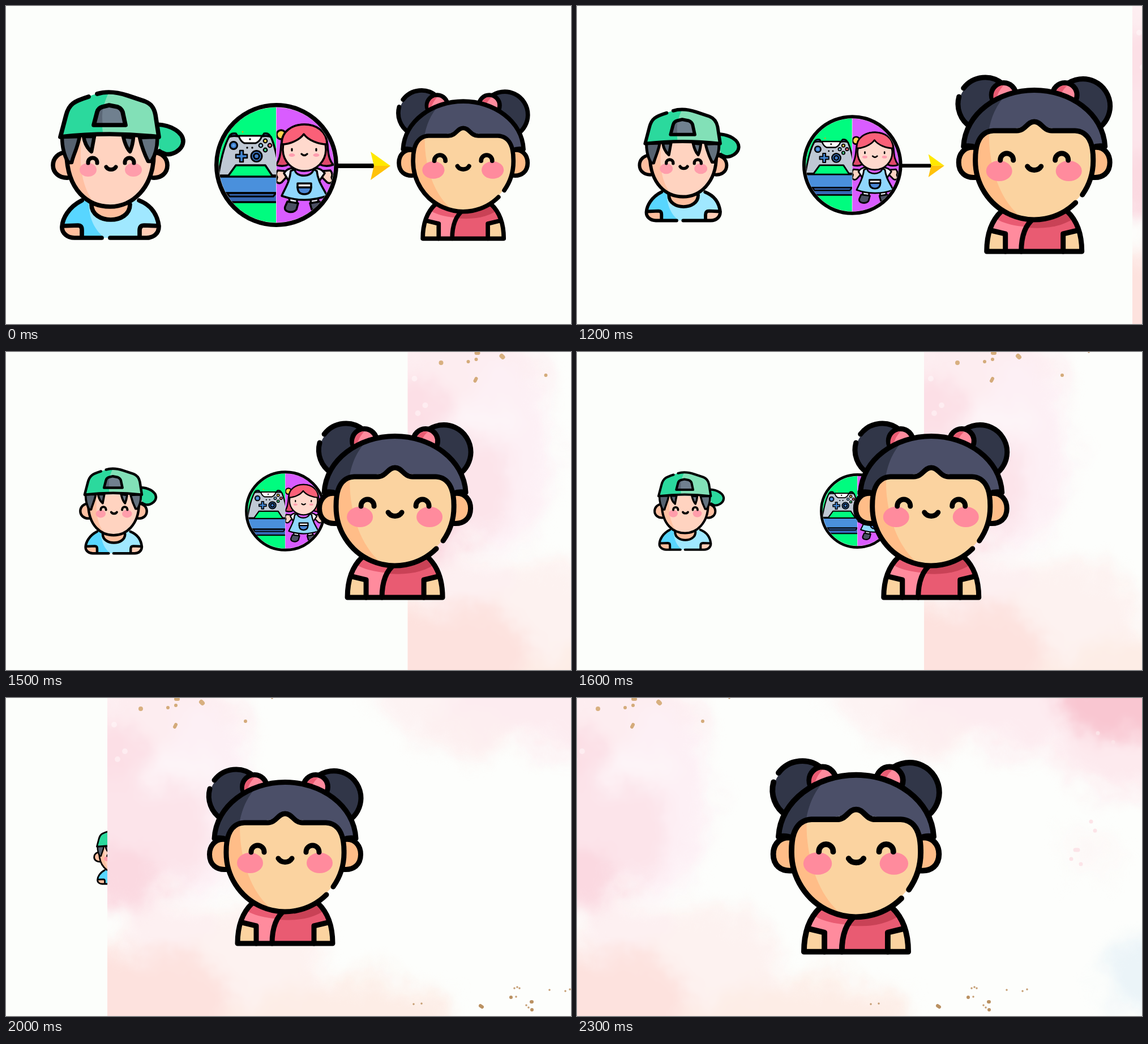
Animation of 998x561 px, one loop 2700 ms. Source, as an HTML page:

```html
<!DOCTYPE html>
<html lang="en">
<head>
<meta charset="utf-8">
<title>Boy, toys and girl</title>
<style>
  html, body { margin: 0; width: 100%; height: 100%; overflow: hidden; background: #fcfefb; }
  svg { display: block; width: 100%; height: 100%; }
  .ink { fill: none; stroke: #000; stroke-linecap: round; stroke-linejoin: round; }
  .line { stroke: #000; stroke-linecap: round; stroke-linejoin: round; }
  .dots { fill: none; stroke-linecap: round; }
</style>
</head>
<body>
<svg viewBox="0 0 998 561">
  <defs>
    <clipPath id="capClip"><path d="M96 231L106 193C111 173 120 168 148 159C175 149 194 151 215 158L245 168C258 173 262 182 264 192L270 231Q183 221 96 231Z"/></clipPath>
    <clipPath id="faceClip"><path d="M107 230V268C110 325 145 354 184 354C222 354 260 322 261 268V230Z"/></clipPath>
    <clipPath id="shirtClip"><path d="M134 343C110 355 100 375 99 389C98 401 109 409 121 409H248C261 409 270 401 270 389C268 370 258 352 235 343Z"/></clipPath>
    <clipPath id="holeClip"><path d="M155 210L161 187Q163 180 170 178L182 175L197 178Q204 181 206 187L211 210Z"/></clipPath>
    <clipPath id="discClip"><circle cx="477.5" cy="280.5" r="103"/></clipPath>
    <clipPath id="leftHalf"><path d="M368 170H477V391H368Z"/></clipPath>
    <clipPath id="rightHalf"><path d="M477 170H588V391H477Z"/></clipPath>
    <clipPath id="domeClip"><path d="M368 248C371 189 430 148.500 493 148.500S615 189 618 248L590 290H396Z"/></clipPath>
    <clipPath id="girlFace"><path id="oval" d="M597 270C597 240 587 221 565 220H524C508 220 506 204 493 204S478 220 462 220H421C399 221 389 240 389 270A104 104 0 0 0 597 270Z"/></clipPath>
    <clipPath id="dressClip"><path id="torso" d="M435 362C418 378 409 400 409 433H577C577 400 568 378 551 362Z"/></clipPath>
    <clipPath id="paneClip"><path d="M-22 0H1024V561H-22Z"/></clipPath>
    <filter id="wash" filterUnits="userSpaceOnUse" x="-140" y="-90" width="1280" height="740" color-interpolation-filters="sRGB">
      <feGaussianBlur stdDeviation="17" result="soft"/>
      <feTurbulence type="fractalNoise" baseFrequency=".012" numOctaves="4" seed="7" result="grain"/>
      <feDisplacementMap in="soft" in2="grain" scale="75" xChannelSelector="R" yChannelSelector="G"/>
    </filter>
  </defs>

  <g id="boy">
    <path class="line" stroke-width="7.700" fill="#2bd99d" d="M267 209C292 210 313 223 313 239C312 254 294 264 281 261Q275 259 271 256"/>
    <g clip-path="url(#shirtClip)">
      <path fill="#a0e8ff" d="M95 340H275V412H95Z"/>
      <path fill="#58d6ff" d="M95 340H146C145 376 158 398 178 412H95Z"/>
      <path fill="#ffbe9d" d="M95 388L127 387Q134 387 134 395V412H95Z"/>
      <path fill="#ffcdb6" d="M275 388L244 387Q236 387 236 396V412H275Z"/>
    </g>
    <path class="line" stroke-width="7.700" fill="#ffbe9d" d="M151 350C151 386 219 386 219 350"/>
    <path class="ink" stroke-width="7.700" d="M134 343C110 355 100 375 99 389C98 401 109 409 121 409H169M184 409H248C261 409 270 401 270 389C268 370 258 352 235 343M100 388L127 387Q134 387 134 395V409M270 388L244 387Q236 387 236 396V409"/>
    <path class="line" stroke-width="7.700" fill="#ffc0a2" d="M108 258C92 258 83 269 83 281C83 294 94 304 110 303M261 258C276 259 285 269 285 281C285 294 275 304 259 303"/>
    <g clip-path="url(#faceClip)">
      <path fill="#ffd3c0" d="M100 225H270V360H100Z"/>
      <path fill="#ffc0a2" d="M100 225H134C128 285 133 325 166 360H100Z"/>
    </g>
    <path class="ink" stroke-width="7.700" d="M107 260C108 325 145 354 184 354C222 354 261 322 261 260"/>
    <g fill="#ff9dab"><ellipse cx="145" cy="289" rx="15" ry="12"/><ellipse cx="225" cy="289" rx="15" ry="12"/></g>
    <path class="ink" stroke-width="7" d="M145 277V276A8 8 0 0 1 161 276V277M210 277V276A8 8 0 0 1 226 276V277M177 284C181 290 190 290 194 284"/>
    <path class="line" stroke-width="6.500" fill="#566270" d="M99 231C99 252 104 266 110 276H116C119 262 126 252 130 230ZM137 230C139 243 145 252 151 257L156 230Z"/>
    <path class="line" stroke-width="6.500" fill="#64727f" d="M207 230C210 243 214 252 219 257C222 250 224 243 225 232ZM236 232C240 250 245 262 251 274H257C264 262 268 248 267 231Z"/>
    <g clip-path="url(#capClip)">
      <path fill="#82e0b7" d="M90 145H275V235H90Z"/>
      <path fill="#2bd99d" d="M90 145H186C172 168 165 195 173 235H90Z"/>
    </g>
    <g clip-path="url(#holeClip)">
      <path fill="#70808f" d="M150 170H215V215H150Z"/>
      <path fill="#5b6776" d="M150 170H174Q167 190 172 215H150Z"/>
    </g>
    <path class="ink" stroke-width="7.700" d="M146 160C120 168 111 173 106 193L96 231Q183 221 270 231L264 192C262 182 258 173 245 168L215 158C194 151 177 150 161 155M155 210L161 187Q163 180 170 178L182 175L197 178Q204 181 206 187L211 210Z"/>
  </g>

  <g id="toys">
    <path stroke="#000" stroke-width="8" d="M584 282H652"/>
    <path fill="#ffe800" d="M644 257L679 282H650Z"/>
    <path fill="#ffc20a" d="M650 282H679L644 307Z"/>
    <circle cx="477.500" cy="280.500" r="104" fill="#fcfefb"/>
    <g clip-path="url(#discClip)">
      <g clip-path="url(#leftHalf)">
        <path fill="#00fc7f" d="M368 170H477V391H368Z"/>
        <path class="line" stroke-width="3.500" fill="#4a90dc" d="M374 301H490V330H374Z"/>
        <path class="line" stroke-width="3.500" fill="#3668b4" d="M380 330H490V346H380Z"/>
        <path class="ink" stroke-width="3" d="M390 330L395 336H472L477 330"/>
        <path class="line" stroke-width="3.500" fill="#3a6cb5" d="M393 233Q396 223 406 225L410 231ZM468 233Q465 223 456 225L452 231Z"/>
        <path class="line" stroke-width="3.500" fill="#bfc8d4" d="M394 231Q400 228 411 230H452Q462 228 468 231C474 245 480 270 484 299H470L458 281H406L393 299H377Q375 299 376 293C380 270 386 245 394 231Z"/>
        <path class="line" stroke-width="3" fill="#fff" d="M411 229H452Q449 239 441 242H421Q414 239 411 229Z"/>
        <path class="line" stroke-width="2.500" fill="#4285d2" d="M413 255H419V262H426V268H419V275H413V268H406V262H413Z"/>
        <g class="line" stroke-width="3" fill="#3d7ac8">
          <circle cx="402" cy="246" r="6.500"/><circle cx="442.500" cy="265" r="9.500"/><circle cx="442.500" cy="265" r="4.800"/>
        </g>
        <circle cx="402" cy="246" r="2.500" fill="#62a5e8"/>
        <g class="line" stroke-width="2.200">
          <circle cx="458" cy="238" r="3.300" fill="#ffd64d"/><circle cx="450" cy="246" r="3.300" fill="#8fd8ff"/>
          <circle cx="466" cy="246" r="3.300" fill="#f9657a"/><circle cx="458" cy="254" r="3.300" fill="#45cf82"/>
        </g>
        <path class="ink" stroke-width="3.500" d="M426 250h0M435 250h0M431 235h0"/>
        <circle cx="418" cy="222" r="1.500" fill="#d9a514"/>
      </g>
      <g clip-path="url(#rightHalf)">
        <path fill="#d95cff" d="M477 170H588V391H477Z"/>
        <g class="line" stroke-width="3.500">
          <circle cx="486" cy="227" r="8" fill="#ffd34d"/>
          <path fill="#e0496a" d="M527 209C505 209 488 222 486 245C485 262 483 272 477 280Q489 285 500 279H553Q565 285 578 280C571 272 569 262 568 245C566 222 549 209 527 209Z"/>
          <path fill="#e6e8f1" d="M500 333H514V351H501ZM539 333H552L551 351H538Z"/>
          <path fill="#4b5063" d="M497 345L516 348L513 359Q508 365 499 363Q491 361 493 354ZM537 348L554 345L560 355Q558 362 549 361L540 359Z"/>
          <path fill="#ffd3c2" d="M491 291L480 290Q475 296 479 302L477 309Q481 315 487 311L497 300ZM561 291L573 290Q578 296 575 302L577 309Q573 315 567 311L556 300Z"/>
          <path fill="#eceff7" d="M508 286Q496 286 491 295L499 308L511 298ZM545 286Q557 286 563 295L554 308L541 298Z"/>
          <path fill="#90d7fc" d="M510 288C511 303 541 303 543 288L549 291C551 311 561 321 567 335Q547 342 527 342T487 335C493 321 501 311 503 291Z"/>
          <path fill="#4a86d4" d="M515 319H539Q539 332 527 332T515 319Z"/>
          <path fill="#fff" d="M515 313H539V320H515Z"/>
          <circle cx="527" cy="253" r="38" fill="#ffd9cd"/>
          <path fill="#fa6078" d="M526 226C519 236 502 244 487 244C486 220 507 209 527 209S567 220 567 244C552 244 534 237 526 226Z"/>
        </g>
        <g fill="#ff9daf"><ellipse cx="505" cy="263" rx="5.500" ry="3"/><ellipse cx="548" cy="263" rx="5.500" ry="3"/></g>
        <path class="ink" stroke-width="3.200" d="M505 252v3M548 252v3M522 261Q527 266 532 261"/>
      </g>
      <path stroke="#fcfefb" stroke-width=".8" stroke-opacity=".8" d="M477.500 175V386"/>
      <circle cx="477.500" cy="280.500" r="102" fill="none" stroke="#eef0ee" stroke-width="1"/>
    </g>
    <circle cx="477.500" cy="280.500" r="105.700" fill="none" stroke="#000" stroke-width="7.600"/>
  </g>

  <g id="pane">
    <g clip-path="url(#paneClip)">
      <path fill="#fdfefc" d="M-22 0H1024V561H-22Z"/>
      <g filter="url(#wash)">
        <ellipse cx="60" cy="50" rx="170" ry="85" fill="#fdedf0"/>
        <ellipse cx="150" cy="180" rx="85" ry="160" fill="#fdf0f5"/>
        <ellipse cx="10" cy="220" rx="150" ry="130" fill="#fce4ea"/>
        <ellipse cx="-20" cy="90" rx="60" ry="60" fill="#fcdfe6"/>
        <ellipse cx="0" cy="320" rx="80" ry="50" fill="#fbd9e1"/>
        <ellipse cx="330" cy="555" rx="260" ry="65" fill="#fdede6"/>
        <ellipse cx="170" cy="460" rx="200" ry="90" fill="#fdf2f0"/>
        <ellipse cx="20" cy="540" rx="180" ry="100" fill="#fde2de"/>
        <ellipse cx="90" cy="405" rx="75" ry="55" fill="#fdf0f1"/>
        <ellipse cx="110" cy="125" rx="60" ry="35" fill="#fdf4f7"/>
        <ellipse cx="560" cy="10" rx="120" ry="55" fill="#fdf3f3"/>
        <ellipse cx="780" cy="15" rx="200" ry="75" fill="#fdecf0"/>
        <ellipse cx="620" cy="68" rx="95" ry="28" fill="#fdf0f0"/>
        <ellipse cx="980" cy="80" rx="130" ry="90" fill="#fdeaee"/>
        <ellipse cx="970" cy="10" rx="125" ry="65" fill="#f9c6d1"/>
        <ellipse cx="1000" cy="490" rx="65" ry="70" fill="#ebf4f8"/>
        <ellipse cx="900" cy="275" rx="45" ry="40" fill="#fdf8f7"/>
      </g>
      <path class="dots" stroke="#fff" stroke-opacity=".4" stroke-width="10" d="M9 94h0M-10 47h0M-4 108h0"/>
      <path class="dots" stroke="#fce4e8" stroke-width="7" d="M908 218h0M915 234h0M873 284h0M880 268h5M890 293h0M947 78h0M920 62h0"/>
      <path class="dots" stroke="#d8b080" stroke-width="8" d="M37 19h0M144 7l2 2"/>
      <path class="dots" stroke="#d4ab7a" stroke-width="6" d="M97 51l2 -4M85 17h0M222 41h0M99 2h4M99 13h0"/>
      <path class="dots" stroke="#ba9162" stroke-width="6" d="M637 543l3 2M691 528h0M727 536h1M728 550h0"/>
      <path class="dots" stroke="#c49d72" stroke-width="3.500" d="M519 540h0M533 539h0M697 512h0M702 510h0M706 512h0M700 527h0M718 542h0M722 546h0M759 515h0M787 517h0M795 514h0M269 0h0"/>
    </g>
  </g>

  <g id="girl">
    <g>
      <circle cx="407" cy="177" r="48" fill="#313648"/>
      <path class="ink" stroke-width="9" d="M380 213A48 48 0 0 1 360 160M368 145A48 48 0 0 1 438 138"/>
    </g>
    <g transform="matrix(-1 0 0 1 986 0)">
      <circle cx="407" cy="177" r="48" fill="#313648"/>
      <path class="ink" stroke-width="9" d="M380 216A48 48 0 0 1 359 177A48 48 0 0 1 438 140"/>
    </g>
    <g class="line" stroke-width="9" fill="#ff8b9d"><circle cx="439" cy="157" r="21.500"/><circle cx="547" cy="157" r="21.500"/></g>
    <path fill="#e95b72" d="M436 140C421 143 417 160 424 172C426 160 430 150 438 141ZM545 140C535 142 530 150 530 160L540 164C540 153 544 147 551 141Z"/>
    <g clip-path="url(#dressClip)">
      <path fill="#ff8b9d" d="M400 355H586V440H400Z"/>
      <path fill="#e95b72" d="M400 355H586V372C550 398 440 396 420 370Z"/>
      <path fill="#e95b72" d="M493 373C478 385 470 403 470 436H586V355Z"/>
      <path fill="#c94256" d="M493 373L482 391C520 394 550 387 572 368L560 350Z"/>
      <path fill="#fbd3a0" d="M400 393L442 402V436H400ZM586 393L544 402V436H586Z"/>
    </g>
    <use href="#torso" class="ink" stroke-width="9"/>
    <path class="ink" stroke-width="9" d="M493 374C478 385 470 403 470 433M417 396L442 402V433M569 396L544 402V433"/>
    <path class="line" stroke-width="9" fill="#ffbd88" d="M390 250C371 246 359.500 260 359.500 276C359.500 293 371 305 392 302M596 250C615 246 626.500 260 626.500 276C626.500 293 615 305 594 302"/>
    <path fill="#4b4f68" d="M368 248C371 189 430 148.500 493 148.500S615 189 618 248L595 250L560 222L493 210L426 222L391 250Z"/>
    <g clip-path="url(#domeClip)"><path fill="#313648" d="M360 140H464C434 158 417 188 412 224L391 250H360Z"/></g>
    <path class="ink" stroke-width="9" d="M391 250Q379 245 368 248C371 189 430 148.500 493 148.500S615 189 618 248Q607 245 595 250"/>
    <use href="#oval" fill="#fbd3a0"/>
    <g clip-path="url(#girlFace)"><path fill="#ffbd88" d="M380 210H414C409 268 427 342 474 376H380Z"/></g>
    <path class="ink" stroke-width="9" d="M578 333A104 104 0 0 0 597 270C597 240 587 221 565 220H524C508 220 506 204 493 204S478 220 462 220H421C399 221 389 240 389 270A104 104 0 0 0 566 347"/>
    <g fill="#ff8b9d"><ellipse cx="431" cy="291" rx="23" ry="18"/><ellipse cx="554" cy="291" rx="23" ry="18"/></g>
    <path class="ink" stroke-width="9" d="M433 272V271.500A11.500 11.500 0 0 1 456 271.500V272M530 272V271.500A11.500 11.500 0 0 1 553 271.500V272M481 283C486 291.500 500 291.500 505 283"/>
  </g>
</svg>
<script>
  const LOOP = 2700, HOLD = 1000, STEP = 100, LAST = 14, MID = 280.5;
  const $ = id => document.getElementById(id);
  const boy = $('boy'), toys = $('toys'), pane = $('pane'), girl = $('girl');
  const clamp = (v, lo, hi) => Math.min(hi, Math.max(lo, v));

  // Left edge of the sliding backdrop: [step, x]
  const edge = [[0, 1100], [2, 1064], [3, 981], [5, 806], [7, 613], [11, 179], [12, 72], [13, -22], [14, -22]];

  function edgeAt(n) {
    const i = Math.max(1, edge.findIndex(p => p[0] >= n));
    const [a, x] = edge[i - 1], [b, y] = edge[i];
    return x + (y - x) * (n - a) / (b - a);
  }

  // Scale about (ox, MID) and move that point to x
  function place(el, ox, x, s) {
    el.setAttribute('transform', `translate(${x} ${MID}) scale(${s}) translate(${-ox} ${-MID})`);
  }

  function draw(n) {
    place(boy, 198.3, 198.3, 0.9135 ** n);
    place(toys, 523, 523, 0.931 ** n);
    pane.setAttribute('transform', `translate(${edgeAt(n) + 22} 0)`);
    const slide = n > 3 ? (1 - Math.cos(Math.PI * clamp((n - 2.6) / 8, 0, 1))) / 2 : 0;
    const size = 1.055 ** (Math.min(n, 3) - 3) * 1.047 ** Math.max(0, n - 12);
    place(girl, 493, 807.7 - 314.7 * slide, size);
  }

  let shown = -1;
  function tick() {
    const t = performance.now() % LOOP;
    const n = t < HOLD ? 0 : Math.min(LAST, Math.floor((t - HOLD) / STEP) + 1);
    if (n !== shown) draw(shown = n);
    requestAnimationFrame(tick);
  }
  tick();
</script>
</body>
</html>
```
